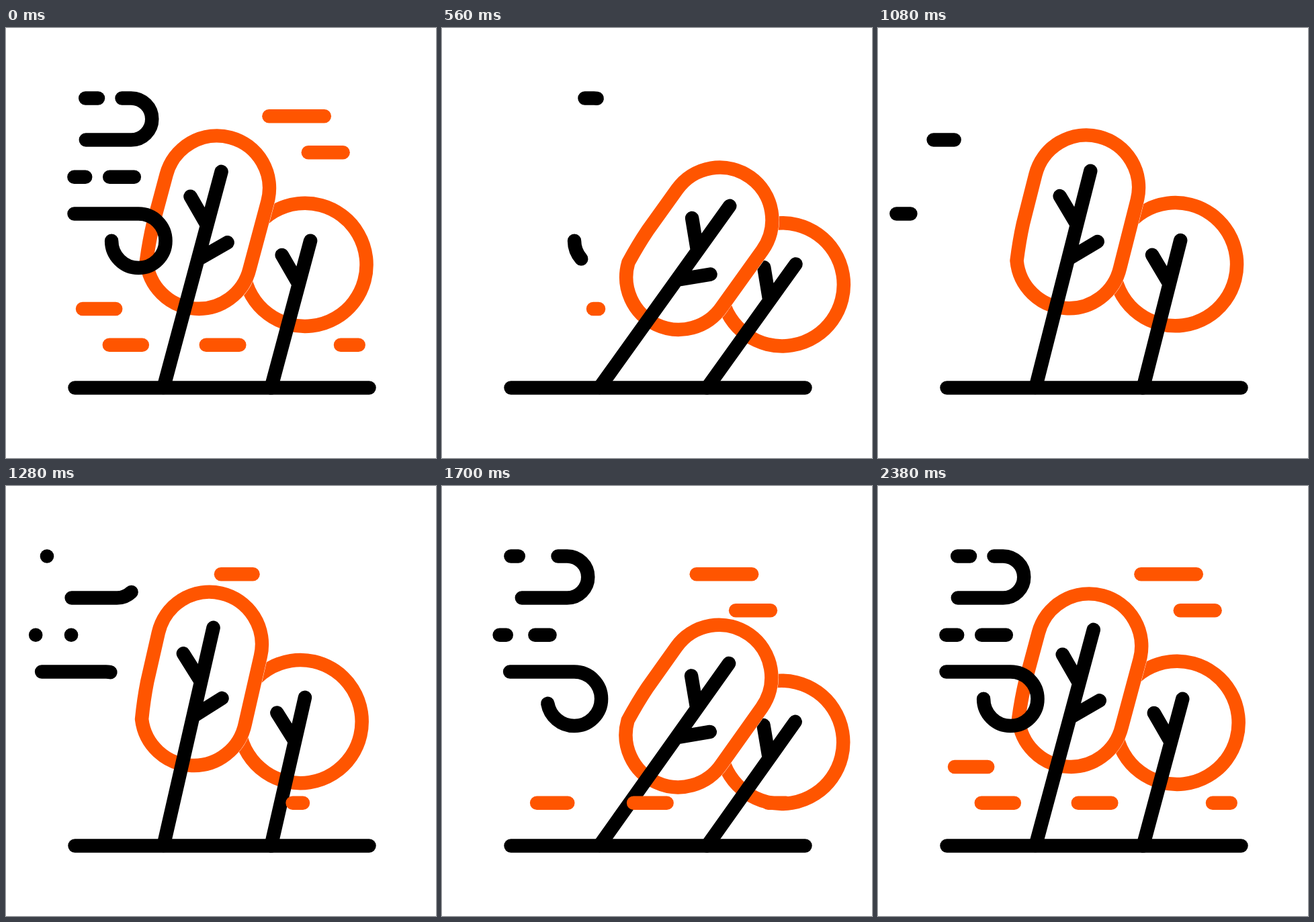
An HTML page for the animation above (2.4 s loop, 640 px wide and 640 px high).

```html
<!DOCTYPE html>
<html lang="en">
<head>
<meta charset="utf-8">
<title>Trees in the wind</title>
<style>
  html, body { margin: 0; width: 100%; height: 100%; overflow: hidden; background: #fff; }
  svg { display: block; width: 100vw; height: 100vh; }
  path, circle { fill: none; stroke: #000; stroke-width: 20.5; stroke-linecap: round; stroke-linejoin: round; }
  .leaf { fill: #fff; stroke: #f50; }
  .halo { stroke: #fff; stroke-width: 21.3; }
  .warm { stroke: #f50; }
</style>
</head>
<body>
<svg viewBox="0 0 640 640">
  <g class="tree" data-x="394.5" data-y="535.5">
    <circle class="leaf" cx="1.3" cy="-190" r="91.6"/>
    <path d="M0 0V-226.5M-35.5-195L0-159.5"/>
  </g>
  <g class="tree" data-x="234.5" data-y="535">
    <path class="halo" d="M-78-307A78 78 0 0 1 78-307V-204A78 78 0 0 1-73.5-176C-75.5-192-77.5-215-78-232Z"/>
    <path class="leaf" d="M-78-307A78 78 0 0 1 78-307V-204A78 78 0 0 1-73.5-176C-75.5-192-77.5-215-78-232Z"/>
    <path d="M0 0V-332.5M-35-285L0-250M36-233L0-197"/>
  </g>
  <path d="M102.5 535.5H540.5"/>
  <g id="wind"></g>
</svg>
<script>
const LOOP = 2400, TURN = 800;

// Sway: [time, degrees]
const sway = [[0, 15], [700, 38], [1190, 10.8], [1700, 35.4], [2400, 15]];

// Wind groups: travel out and in as [distance, start, end]
const topCurl = { out: [44.5, 0, 700], in: [44.5, 850, 1685] };
const lowCurl = { out: [44.5, 0, 700], in: [82, 925, 1735] };
const puff = { out: [60, 0, 700], in: [60, 1180, 1965] };
const warm = { out: [83, 0, 750], in: [83, 1091, 1901], cls: 'warm' };

// [group, path, erase start, erase end, draw start, draw end]
const gusts = [
  [topCurl, 'M118.8 166.6H186.2A31 31 0 0 0 186.2 104.5H172.5', 0, 700, 862, 1688],
  [lowCurl, 'M101.5 276.6H197.3A40.2 40.2 0 1 1 157.1 316.8', 0, 700, 942, 1779],
  [puff, 'M118.2 104.4H137', 0, 530, 1245, 2045],
  [puff, 'M101.4 221.7H118.2', 0, 530, 1245, 2045],
  [puff, 'M154.2 221.7H190.8', 0, 530, 1245, 2045],
  [warm, 'M391.4 131.2H473.8', 0, 300, 1110, 1420],
  [warm, 'M449.8 185.3H501.6', 60, 360, 1342, 1642],
  [warm, 'M498 471.8H524.7', 0, 300, 1110, 1420],
  [warm, 'M297.8 471.8H347.3', 100, 400, 1410, 1700],
  [warm, 'M153.8 471.8H202.8', 100, 400, 1445, 1745],
  [warm, 'M114 418H163.2', 338, 638, 1740, 2040]
];

const ease = (t, a, b) => {
  const s = Math.min(1, Math.max(0, (t - a) / (b - a)));
  return s * s * (3 - 2 * s);
};

const trees = [...document.querySelectorAll('.tree')];
const wind = document.getElementById('wind');
const strokes = gusts.map(([group, d]) => {
  const p = document.createElementNS('http://www.w3.org/2000/svg', 'path');
  p.setAttribute('d', d);
  p.setAttribute('pathLength', 1);
  if (group.cls) p.setAttribute('class', group.cls);
  return wind.appendChild(p);
});

function angleAt(t) {
  const i = sway.findIndex(([end], k) => k && t <= end);
  const [t0, a] = sway[i - 1], [t1, b] = sway[i];
  return a + (b - a) * ease(t, t0, t1);
}

function drawGust(p, [group, , e0, e1, d0, d1], t) {
  const leaving = t < TURN;
  const [dist, t0, t1] = leaving ? group.out : group.in;
  const shift = dist * (ease(t, t0, t1) - (leaving ? 0 : 1));
  const from = leaving ? ease(t, e0, e1) : 0;
  const len = leaving ? 1 - from : ease(t, d0, d1);
  p.setAttribute('visibility', len > 0.001 ? 'visible' : 'hidden');
  p.setAttribute('transform', `translate(${shift} 0)`);
  p.setAttribute('stroke-dasharray', len < 1 ? `${len} 2` : 'none');
  p.setAttribute('stroke-dashoffset', -from);
}

function draw(t) {
  const angle = angleAt(t);
  for (const g of trees)
    g.setAttribute('transform', `translate(${g.dataset.x} ${g.dataset.y}) rotate(${angle})`);
  strokes.forEach((p, i) => drawGust(p, gusts[i], t));
}

const start = performance.now();
function tick() {
  draw((performance.now() - start) % LOOP);
  requestAnimationFrame(tick);
}
draw(0);
requestAnimationFrame(tick);
</script>
</body>
</html>
```
